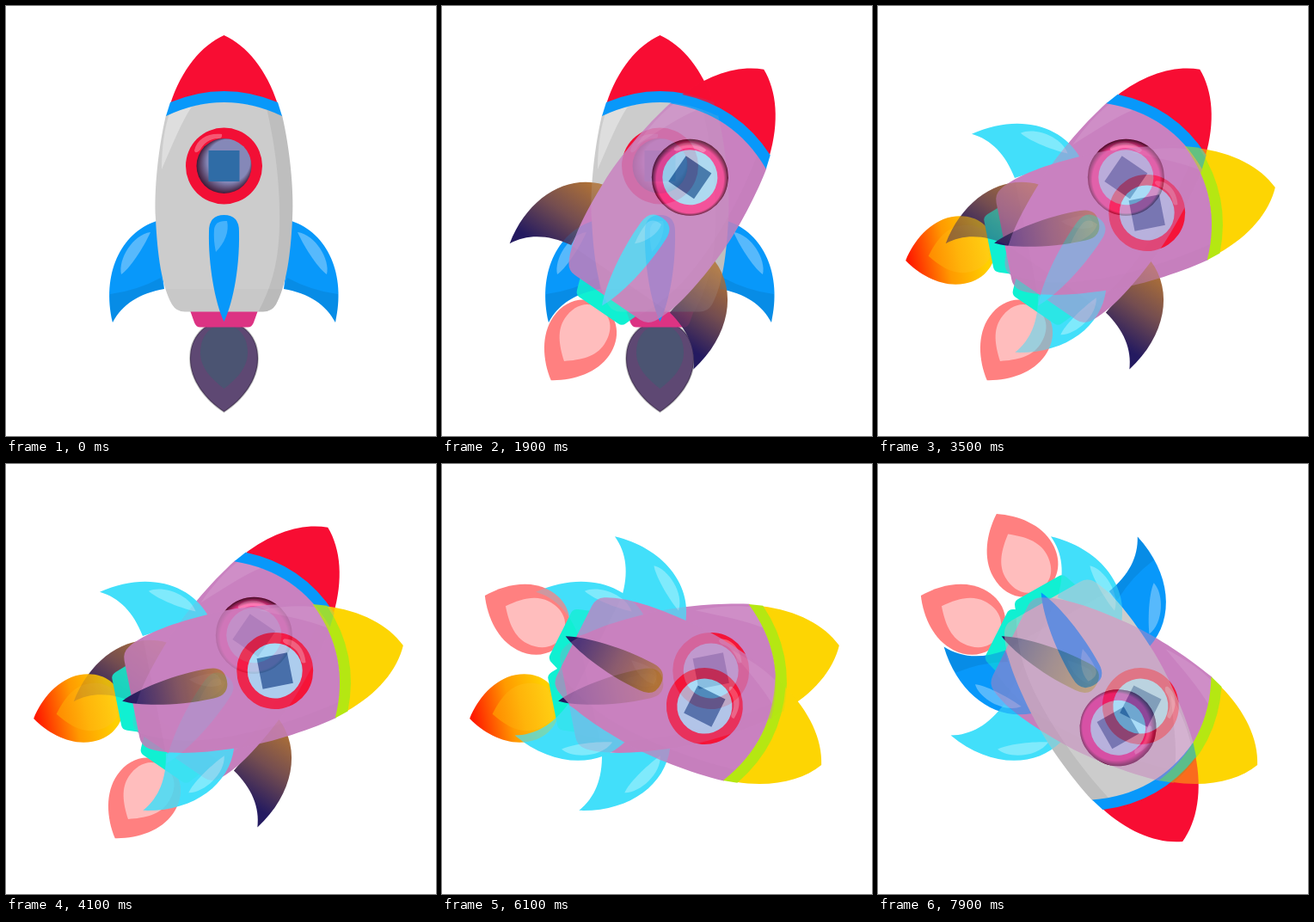
An HTML page with a canvas that plays this animation: 500x500 px, repeating every 8 s.

```html
<!DOCTYPE html>
<html lang="en">
<head>
<meta charset="utf-8">
<title>Rocket crossfade</title>
<style>
  html, body { margin: 0; width: 100%; height: 100%; overflow: hidden; background: #fff; }
  canvas { display: block; width: 100vw; height: 100vh; }
</style>
</head>
<body>
<canvas id="stage" width="500" height="500"></canvas>
<script>
const SIZE = 500, LOOP = 8000, CYCLE = 2200, HOLD = 400, STEP = 100, STEPS = 19;
const AXIS = 253.5, MIDDLE = 253;

// Outlines of the upright rocket
const shape = {
  nose: 'M253.5 34C227 46 204 74 191 114Q253.5 86 316 114C303 74 280 46 253.5 34Z',
  band: 'M191 112L186 128Q253.5 96 321 128L316 112Q253.5 86 191 112Z',
  body: 'M186 127C177 165 172 215 174 247C176 290 181 325 193 347Q198 355.5 208 355.5H299Q309 355.5 314 347C326 325 331 290 333 247C335 215 330 165 321 127Q253.5 96 186 127Z',
  shade: 'M303 119C315 170 319 220 318 255C317 295 310 325 293 356H340V119Z',
  shine: 'M190 125Q201 119 216 117C204 135 194 160 181 190C181 165 184 143 190 125Z',
  base: 'M176 329H331V357H176Z',
  fin: 'M175 250C133 264 111 312 124 368C135 347 155 334 184 329Z',
  finShade: 'M121 335Q152 331 180 316L184 329C155 334 135 347 124 368Q120 350 121 335Z',
  finShine: 'M168 263C147 266 130 295 134 312C143 306 159 283 168 263Z',
  keel: 'M236 262Q236 243 253.5 243Q271 243 271 262C272 310 262 350 253.5 367C243 345 235 300 236 262Z',
  keelShine: 'M242 260Q243 249 257 250C260 262 254 276 244 286Q241 272 242 260Z',
  nozzle: 'M214 354H293L288 368Q286 373.5 281 373.5H226Q221 373.5 219 368Z',
  flame: 'M253.5 472C232 458 214 435 214 410C214 385 230 367 253.5 367C277 367 293 385 293 410C293 435 275 458 253.5 472Z',
  core: 'M253.5 445C238 433 226 420 226 403C226 386 235 371 253.5 371C272 371 281 386 281 403C281 420 269 433 253.5 445Z',
  ringShine: 'M219 168C222 154 236 147 251 149Q252 154 247 154C236 154 229 161 226 167Q220 173 219 168Z'
};
for (const name in shape) shape[name] = new Path2D(shape[name]);

const RED = '#f80d33', BLUE = '#0898fa', CYAN = '#42dffa', PURPLE = '#c981c0';
const TEAL = '#10f0d2', PINK = '#ff8080', ROSE = '#ffbdbd';
const bronze = (top, bottom) => [top, bottom, '#b07236', '#744d50', '#241a60'];

const grey = { body: '#cccccc', shine: .35, nose: RED, band: BLUE, fin: BLUE, keel: BLUE };
const violet = { body: PURPLE, shine: .1, nozzle: TEAL, flame: PINK, core: ROSE, disc: '#a9dcf7' };
const golden = { ...violet, nose: '#fdd503', band: '#b5e712', fin: CYAN, keel: bronze(250, 350), ring: '#f51438' };

const poses = [
  { ...grey, x: 253.5, y: 253, angle: 0, nozzle: '#dc3383', flame: '#5e4873', core: '#4b5472',
    ring: '#f20f35', disc: '#8588b8', dusky: true },
  { ...violet, x: 250.5, y: 254.5, angle: 34.4, nose: RED, band: BLUE, fin: bronze(255, 350),
    keel: '#52d2f4', ring: '#fb3c92', rim: true },
  { ...golden, x: 247, y: 253.5, angle: 78.8, flame: [380, 468, '#ffd000', '#ff9a00', '#ff1a00'],
    core: [375, 445, '#ffce12', '#ffb40a', '#ff8a00'] },
  { ...golden, x: 245.5, y: 251.5, angle: 116.7 },
  { ...grey, x: 246, y: 248.5, angle: 150.4, nozzle: TEAL, flame: PINK, core: ROSE,
    ring: '#e4268c', disc: '#a9dcf7', rim: true }
];

function paint(ctx, fill) {
  if (!Array.isArray(fill)) return fill;
  const [top, bottom, ...colors] = fill;
  const gradient = ctx.createLinearGradient(0, top, 0, bottom);
  colors.forEach((color, i) => gradient.addColorStop(i / (colors.length - 1), color));
  return gradient;
}

function drawRocket(pose) {
  const layer = document.createElement('canvas');
  layer.width = layer.height = SIZE;
  const ctx = layer.getContext('2d');
  const fill = (name, color) => {
    ctx.fillStyle = paint(ctx, color);
    ctx.fill(shape[name]);
  };
  const disc = (radius, color) => {
    ctx.fillStyle = color;
    ctx.beginPath();
    ctx.arc(AXIS, 186, radius, 0, 2 * Math.PI);
    ctx.fill();
  };
  const white = alpha => `rgba(255,255,255,${alpha})`;
  const black = alpha => `rgba(0,0,0,${alpha})`;

  ctx.translate(pose.x, pose.y);
  ctx.rotate(pose.angle * Math.PI / 180);
  ctx.translate(-AXIS, -MIDDLE);

  fill('flame', pose.flame);
  fill('core', pose.core);
  if (pose.dusky) {
    ctx.strokeStyle = black(.22);
    ctx.lineWidth = 2;
    ctx.stroke(shape.flame);
  }
  fill('nozzle', pose.nozzle);

  for (const side of [1, -1]) {
    ctx.save();
    ctx.translate(AXIS, 0);
    ctx.scale(side, 1);
    ctx.translate(-AXIS, 0);
    fill('fin', pose.fin);
    if (pose.fin === BLUE) fill('finShade', black(.08));
    if (!Array.isArray(pose.fin)) fill('finShine', white(.32));
    ctx.restore();
  }

  fill('body', pose.body);
  ctx.save();
  ctx.clip(shape.body);
  fill('shade', black(pose.shine > .2 ? .07 : .015));
  fill('base', black(.02));
  fill('shine', white(pose.shine));
  ctx.restore();
  fill('nose', pose.nose);
  fill('band', pose.band);

  fill('keel', pose.keel);
  fill('keelShine', white(Array.isArray(pose.keel) ? .05 : .25));

  disc(44.5, pose.ring);
  fill('ringShine', white(.3));
  if (pose.rim) {
    // Bevel that darkens towards the edge, strongest at the upper left
    const bevel = ctx.createRadialGradient(255, 188, 39, AXIS, 186, 45);
    bevel.addColorStop(0, 'rgba(42,6,24,0)');
    bevel.addColorStop(1, 'rgba(42,6,24,.95)');
    disc(44.5, bevel);
  }
  if (pose.dusky) {
    const shadow = ctx.createRadialGradient(259, 180, 25, 254, 186, 33);
    shadow.addColorStop(0, pose.disc);
    shadow.addColorStop(1, '#3c1430');
    disc(32, shadow);
  } else {
    disc(32, pose.disc);
  }
  ctx.fillStyle = '#2f6ca6';
  ctx.fillRect(AXIS - 18, 168, 36, 36);
  return layer;
}

const layers = poses.map(drawRocket);
const stage = document.getElementById('stage').getContext('2d');

function put(layer, mode, alpha) {
  stage.globalCompositeOperation = mode;
  stage.globalAlpha = alpha;
  stage.drawImage(layer, 0, 0);
}

function render(time) {
  const index = Math.floor(time / CYCLE);
  const step = Math.floor((time % CYCLE - HOLD) / STEP) + 1;
  const mix = Math.max(0, step) / STEPS;
  stage.clearRect(0, 0, SIZE, SIZE);
  put(layers[index], 'source-over', 1);
  if (mix <= 0) return;
  // The next rocket fades in inside the old outline; the rest of it pops in halfway.
  put(layers[index + 1], 'source-atop', mix);
  if (mix >= .5) put(layers[index + 1], 'destination-over', 1);
}

let start;
function tick(now) {
  start ??= now;
  render((now - start) % LOOP);
  requestAnimationFrame(tick);
}
render(0);
requestAnimationFrame(tick);
</script>
</body>
</html>
```
